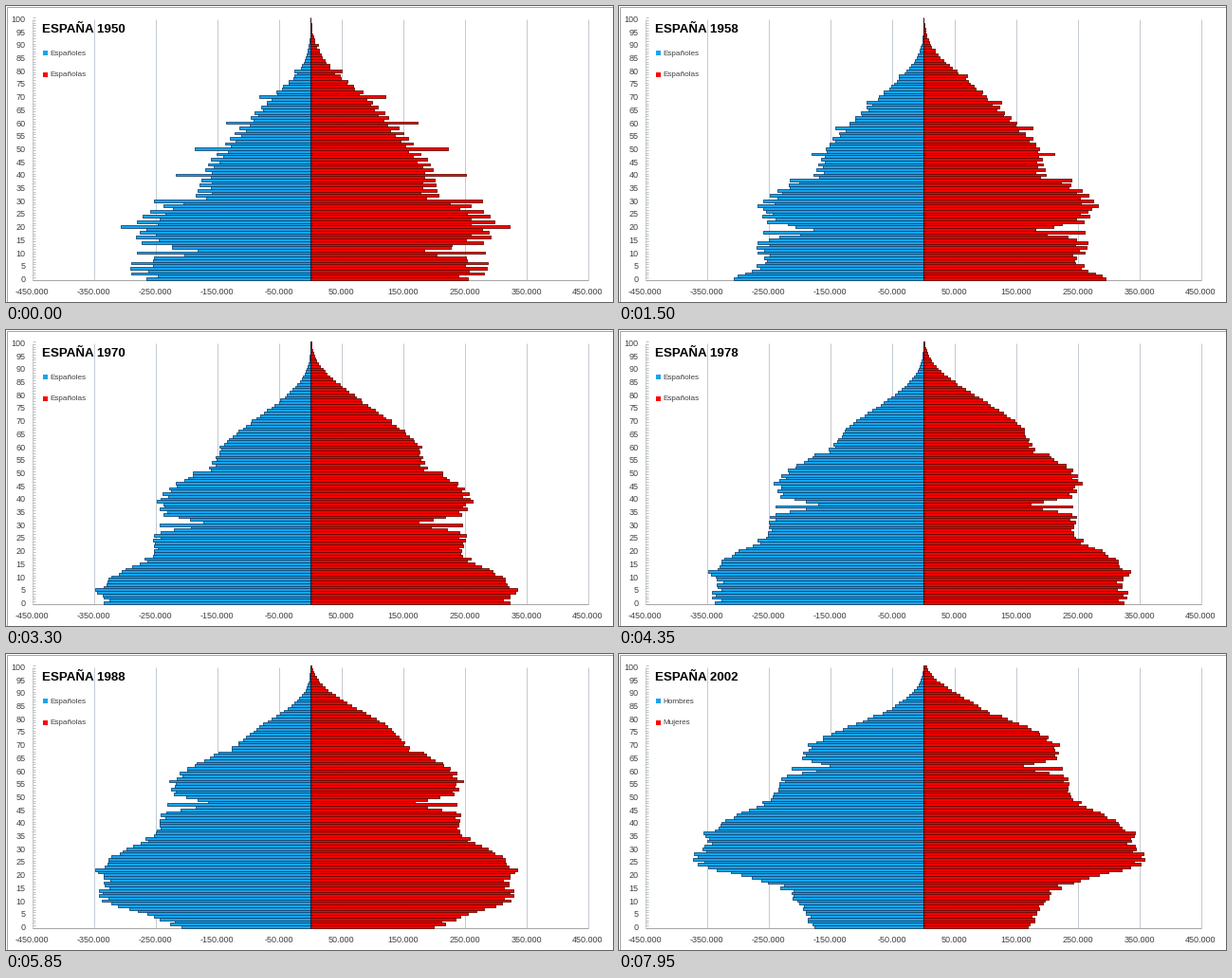
Animation, 640 px wide and 312 px high, one loop 8 s. Source, as a matplotlib script:

```python
import numpy as np
import matplotlib.pyplot as plt
from matplotlib.animation import FuncAnimation
from matplotlib.collections import LineCollection, PolyCollection
from matplotlib.patches import Rectangle

W, H, DPI = 640, 312, 100
PX = 72 / DPI
INTERVAL, FRAMES = 50, 160
HOLD, STEP = 450, 150
CENTER, SCALE = 320.5, 0.6511        # pixels, pixels per thousand people
BASE, ROW = 287.5, 2.74              # y of age 0, pixels per year of age
LAST = 51
AGES = np.arange(101)
BLUE, RED = "#14a5ee", "#ff0000"

# (age in 1950, thousands born): baby boom, wartime gap, older generations.
GENERATIONS = [
    (-51, 178), (-46, 190), (-37, 213), (-35, 227), (-28, 324), (-25, 343),
    (-18, 331), (-15, 345), (-7, 305), (-4, 266), (0, 252), (7, 242), (9, 190),
    (10, 238), (11, 170), (14, 234), (19, 245), (26, 226), (30, 202), (31, 177),
    (40, 183), (50, 160), (60, 140), (70, 130), (80, 100), (100, 80)]
JITTER = np.random.default_rng(4).normal(1, .015, 101 + LAST)


def survival(k, women):
    """Gompertz curve; life gets longer as the years pass."""
    typical_age = 73.5 + .165 * k + 5 * women
    spread = 12.5 - .05 * k
    return np.exp(-np.exp((AGES - typical_age) / spread))


def rounded_ages(k, cohort):
    """Early counts pile up on round and even ages, less so with time."""
    round_age = np.interp(cohort, [20, 50], [.1, .32]) * ((cohort % 10 == 0) & (cohort >= 20))
    even_age = .05 * np.cos(np.pi * cohort) * (cohort >= 0)
    return 1 + (round_age + even_age) * np.exp(-k / 9)


def migration(k, cohort):
    """Young people leave in the first decades and arrive in the last one."""
    leaving = np.interp(cohort, [0, 2, 28, 32], [0, .12, .12, 0]) * np.exp(-k / 14)
    arriving = .09 * np.exp(-((AGES - 26) / 9) ** 2) * np.clip((k - 40) / 11, 0, 1)
    return 1 + leaving + arriving


def population(k, women):
    cohort = AGES - k
    born = np.interp(cohort, *zip(*GENERATIONS)) * JITTER[cohort + LAST]
    if women:
        born = born * np.interp(cohort, [0, 40], [.96, 1.13])
    return born * survival(k, women) * rounded_ages(k, cohort) * migration(k, cohort)


EDGES = np.round(BASE + ROW / 2 - ROW * np.arange(102)) - .5


def bars(sizes, side):
    low, high = EDGES[:-1], EDGES[1:]
    inner = np.full(101, CENTER)
    tip = CENTER + side * np.round(SCALE * sizes)
    xs = np.stack([inner, tip, tip, inner], axis=1)
    ys = np.stack([low, low, high, high], axis=1)
    return np.stack([xs, ys], axis=2)


fig = plt.figure(figsize=(W / DPI, H / DPI), dpi=DPI, facecolor="white")
ax = fig.add_axes([0, 0, 1, 1])
ax.set(xlim=(0, W), ylim=(H, 0))
ax.axis("off")


def label(x, y, text, size, **style):
    style = {"color": "#404040", "va": "center_baseline", **style}
    return ax.text(x, y, text, fontsize=size * PX, family="Liberation Sans", **style)


def lines(segments, color, width, z):
    ax.add_collection(LineCollection(segments, colors=color, linewidths=width * PX, zorder=z))


def bar_group(color, edge):
    group = PolyCollection([], facecolors=color, edgecolors=edge, linewidths=.8 * PX, zorder=3)
    return ax.add_collection(group)


TOP, BOTTOM = BASE - 100 * ROW, EDGES[0]

ax.add_patch(Rectangle((.5, .5), W - 1, H - 1, fill=False, ec="#a8a8a2", lw=PX))
for value in range(-450, 451, 100):
    x = np.floor(CENTER + SCALE * value) + .5
    lines([[(x, TOP), (x, BOTTOM)]], "#c3cbd2", 1, 1)
    label(x, 300, f"{value}.000", 9, ha="center")
for age in range(0, 101, 5):
    label(20.5, BASE - ROW * age, str(age), 9, ha="right")
lines([[(27.5, y), (30.5, y)] for y in EDGES], "#b0b5b2", .8, 1)
lines([[(27.5, BOTTOM), (614, BOTTOM)]], "#a6a6a6", 1, 1)
lines([[(CENTER, TOP - 1), (CENTER, BOTTOM)]], "#181828", 1, 4)

left_bars = bar_group(BLUE, "#17406b")
right_bars = bar_group(RED, "#5e0c04")

title = label(37.5, 28, "", 13.4, weight="bold", color="black", va="baseline")
legend = []
for y, color in ((49, BLUE), (72, RED)):
    ax.add_patch(Rectangle((39, y - 2.5), 5, 5, fc=color, ec="none"))
    legend.append(label(46, y, "", 8.1))


def update(frame):
    elapsed = frame * INTERVAL
    k = 0 if elapsed < HOLD else (elapsed - HOLD) // STEP + 1
    year = 1950 + k + (k > 20)       # the series has no 1971
    title.set_text(f"ESPAÑA {year}")
    names = ("Españoles", "Españolas") if year < 1998 else ("Hombres", "Mujeres")
    for text, name in zip(legend, names):
        text.set_text(name)
    left_bars.set_verts(bars(population(k, False), -1))
    right_bars.set_verts(bars(population(k, True), 1))
    return left_bars, right_bars, title, *legend


anim = FuncAnimation(fig, update, frames=FRAMES, interval=INTERVAL, repeat=True, repeat_delay=0)
plt.show()
```
